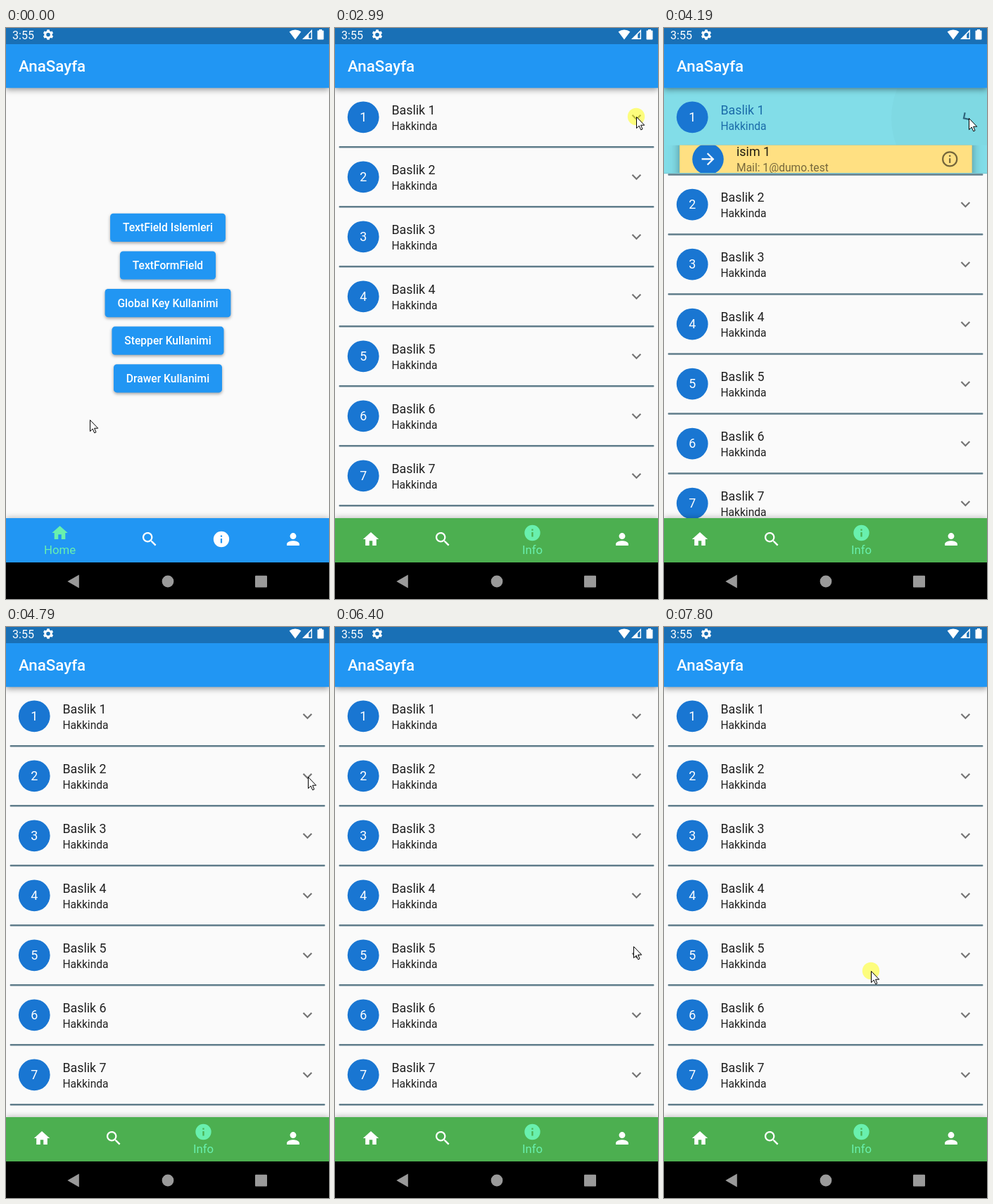
Recreate the animation shown at these times as an HTML page with a canvas. Size 459 by 812 pixels, loop 8 s.

```html
<!DOCTYPE html>
<html lang="tr">
<head>
<meta charset="utf-8">
<title>AnaSayfa</title>
<style>
  html, body { margin: 0; width: 100%; height: 100%; overflow: hidden; background: #fafafa; }
  canvas { display: block; }
</style>
</head>
<body>
<canvas id="stage" width="459" height="812"></canvas>
<script>
const ctx = document.getElementById('stage').getContext('2d');
const W = 459, DP = 1.1157, LOOP = 8000;
const BLUE = '#2196f3', NAVY = '#1976d2', GREEN = '#4caf50', CYAN = '#4dd0e1', AMBER = '#ffe082';
const WHITE = [255, 255, 255, 1], MINT = [105, 240, 174, 1], ACCENT = [33, 150, 243, 1];
const INK = [0, 0, 0, .87], FADED = [0, 0, 0, .54];

const icons = {
  home: 'M10 20v-6h4v6h5v-8h3L12 3 2 12h3v8z',
  search: 'M15.5 14h-.8l-.3-.3A6.5 6.5 0 1 0 13.7 14.4l.3.3v.8l5 5L20.5 19zM9.5 14a4.5 4.5 0 1 1 0-9 4.5 4.5 0 0 1 0 9z',
  info: 'M12 2a10 10 0 1 0 0 20 10 10 0 0 0 0-20zM13 17h-2v-6h2zM13 9h-2V7h2z',
  infoOutline: 'M12 2a10 10 0 1 0 0 20 10 10 0 0 0 0-20zM12 20a8 8 0 1 1 0-16 8 8 0 0 1 0 16zM11 7h2v2h-2zM11 11h2v6h-2z',
  person: 'M12 12a4 4 0 1 0 0-8 4 4 0 0 0 0 8zM12 14c-2.7 0-8 1.3-8 4v2h16v-2c0-2.7-5.3-4-8-4z',
  arrow: 'M12 4l-1.4 1.4L16.2 11H4v2h12.2l-5.6 5.6L12 20l8-8z',
  chevron: 'M16.6 8.6L12 13.2 7.4 8.6 6 10l6 6 6-6z'
};
for (const name in icons) icons[name] = new Path2D(icons[name]);
const pointerShape = new Path2D('M.5.5V16.6L4.2 13.1 6.7 18.8 9 17.8 6.6 12.2H11.7Z');

// Pointer stops: time, x, y
const pointerPath = [
  [170, 119, 557], [970, 308, 724], [1770, 308, 724], [2790, 428, 126], [3590, 428, 126],
  [3990, 433, 128], [4290, 433, 128], [4790, 429, 213], [6190, 429, 213], [6400, 424, 454],
  [7000, 424, 454], [7200, 294, 489]
];
const clicks = [1570, 2990, 3990, 4990, 5990, 6800, 7600, 7800];
// Row index: time it starts to open, time it starts to close
const openings = { 0: [3090, 4090], 1: [5090, 6090], 4: [6900, 7500] };
const PAGE_SWITCH = 1670;

const clamp = v => Math.max(0, Math.min(1, v));
const lerp = (a, b, t) => a + (b - a) * t;
const easeIn = t => t ** 1.67;
const easeOut = t => 1 - (1 - t) ** 1.67;
const smooth = t => t * t * (3 - 2 * t);
const mix = (a, b, t) => `rgba(${a.map((v, i) => lerp(v, b[i], t)).join()})`;
const ramp = (t, start) => clamp((t - start) / 200);

function sampleTime(t) {
  if (t < 370) return 0;
  const offset = t < 2790 ? 370 : t < 6400 ? 390 : 400;
  return Math.floor((t - offset) / 200) * 200 + offset;
}

function pointerAt(t) {
  const next = pointerPath.findIndex(p => p[0] > t);
  if (next === 0) return pointerPath[0].slice(1);
  if (next < 0) return pointerPath[pointerPath.length - 1].slice(1);
  const [t0, x0, y0] = pointerPath[next - 1], [t1, x1, y1] = pointerPath[next];
  const k = smooth((t - t0) / (t1 - t0));
  return [lerp(x0, x1, k), lerp(y0, y1, k)];
}

function rect(x, y, w, h, color, radius = 0) {
  ctx.fillStyle = color;
  ctx.beginPath();
  ctx.roundRect(x, y, w, h, radius);
  ctx.fill();
}

function raised(blur, dy, alpha, ...box) {
  ctx.save();
  ctx.shadowColor = `rgba(0,0,0,${alpha})`;
  ctx.shadowBlur = blur;
  ctx.shadowOffsetY = dy;
  rect(...box);
  ctx.restore();
}

function disc(x, y, r, color) {
  ctx.fillStyle = color;
  ctx.beginPath();
  ctx.arc(x, y, r, 0, 7);
  ctx.fill();
}

function polygon(color, ...points) {
  ctx.fillStyle = color;
  ctx.beginPath();
  for (const p of points) ctx.lineTo(...p);
  ctx.fill();
}

function text(str, x, y, size, color, align = 'left', weight = 400) {
  ctx.font = `${weight} ${size * DP}px Roboto, sans-serif`;
  ctx.textAlign = align;
  ctx.fillStyle = color;
  ctx.fillText(str, x, y);
}

function icon(name, x, y, color, turn = 0) {
  ctx.save();
  ctx.translate(x, y);
  ctx.rotate(turn * 2 * Math.PI);
  ctx.scale(DP, DP);
  ctx.translate(-12, -12);
  ctx.fillStyle = color;
  ctx.fill(icons[name], 'evenodd');
  ctx.restore();
}

function clipped(x, y, w, h, draw) {
  ctx.save();
  ctx.beginPath();
  ctx.rect(x, y, w, h);
  ctx.clip();
  draw();
  ctx.restore();
}

function homePage() {
  ['TextField Islemleri', 'TextFormField', 'Global Key Kullanimi', 'Stepper Kullanimi', 'Drawer Kullanimi']
    .forEach((label, i) => {
      const y = 263.8 + i * 53.6;
      ctx.font = `500 ${14 * DP}px Roboto, sans-serif`;
      const w = ctx.measureText(label).width + 32 * DP;
      raised(4, 2, .35, 230 - w / 2, y, w, 40.2, BLUE, 4.5);
      text(label, 230, y + 25.6, 14, '#fff', 'center', 500);
    });
}

function card(number, top, color) {
  raised(20, 4, .16, 22.3, top, 415.2, 80.3, color, 4.5);
  raised(11, 8, .26, 22.3, top, 415.2, 80.3, color, 4.5);
  disc(62.5, top + 40.2, 22.3, NAVY);
  icon('arrow', 62.5, top + 40.2, '#fff');
  text(`isim ${number}`, 103, top + 35.7, 16, mix(INK, INK, 0));
  text(`Mail: ${number}@dumo.test`, 103, top + 58, 14, mix(FADED, FADED, 0));
  icon('infoOutline', 406.2, top + 40.2, mix(FADED, FADED, 0));
}

// Draws one expandable row and returns the top of the next
function row(i, top, t, pointer) {
  const [opens, closes] = openings[i] || [Infinity, Infinity];
  const v = ramp(t, opens) - ramp(t, closes);
  const unfolded = easeIn(v), tint = easeOut(v);
  const body = 124.9 * unfolded, y = top + 1.2;
  const [back, front] = i % 2 ? [AMBER, CYAN] : [CYAN, AMBER];

  if (v > 0) {
    ctx.globalAlpha = tint;
    rect(0, top, W, 82.6 + body, back);
    rect(0, top, W, 1.1, 'rgba(0,0,0,.12)');
    rect(0, top + 81.5 + body, W, 1.1, 'rgba(0,0,0,.12)');
    ctx.globalAlpha = 1;
    if (v < 1) clipped(0, y, W, 80.3, () => disc(...pointer, 220 * (1 - v), 'rgba(0,0,0,.02)'));
    clipped(0, y + 80.3, W, body, () => card(i + 1, y + 40.1 + body / 2, front));
  }
  const color = mix(INK, ACCENT, tint);
  disc(40.2, y + 40.3, 22.4, NAVY);
  text(i + 1, 40.2, y + 46.7, 16, '#fff', 'center');
  text(`Baslik ${i + 1}`, 80.4, y + 36, 16, color);
  text('Hakkinda', 80.4, y + 58.3, 14, color);
  icon('chevron', 428.4, y + 40.3, mix(FADED, ACCENT, unfolded), unfolded / 2);
  rect(5.6, top + 82.8 + body, W - 11.2, 2.3, '#607d8b', 1);
  return top + 85 + body;
}

function navigation(p) {
  raised(8, -1, .25, 0, 697, W, 63, BLUE);
  const items = [['home', 'Home', 1 - p], ['search', '', 0], ['info', 'Info', p], ['person', '', 0]];
  if (p > 0) clipped(0, 697, W, 63, () => disc(lerp(306, 280.5, p), 728, 310 * p, GREEN));
  let left = 0;
  for (const [name, label, active] of items) {
    const width = 102 * (1 + active / 2), x = left + width / 2;
    icon(name, x, 727 - 9 * active, mix(WHITE, MINT, active));
    ctx.globalAlpha = active;
    text(label, x, 747.8, 15, mix(MINT, MINT, 0), 'center');
    ctx.globalAlpha = 1;
    left += width;
  }
}

function gear(x, y) {
  ctx.strokeStyle = '#fff';
  ctx.lineWidth = 3;
  ctx.beginPath();
  ctx.arc(x, y, 4.3, 0, 7);
  ctx.stroke();
  ctx.lineWidth = 3.6;
  for (let i = 0; i < 6; i++) {
    const a = i * Math.PI / 3 + Math.PI / 6, c = Math.cos(a), s = Math.sin(a);
    ctx.beginPath();
    ctx.moveTo(x + 4.5 * c, y + 4.5 * s);
    ctx.lineTo(x + 7.2 * c, y + 7.2 * s);
    ctx.stroke();
  }
}

function topBars() {
  raised(8, 3, .38, 0, 0, W, 85.3, BLUE);
  text('AnaSayfa', 18, 62.4, 20, '#fff', 'left', 500);
  rect(0, 0, W, 23, '#1970b6');
  text('3:55', 9, 16, 14.4, '#fff');
  gear(60, 9.5);
  ctx.fillStyle = '#fff';
  ctx.beginPath();
  ctx.moveTo(411, 16.5);
  ctx.arc(411, 16.5, 14, -Math.PI * .705, -Math.PI * .295);
  ctx.fill();
  polygon('#fff', [421, 16], [435, 2], [435, 16]);
  polygon('#1970b6', [430.2, 9], [433.6, 5.6], [433.6, 14.6], [430.2, 14.6]);
  rect(442.5, 3.5, 9, 13, '#fff', 1);
  rect(445, 2, 4, 2, '#fff');
}

function systemBar() {
  const gray = '#9a9a9a';
  rect(0, 760, W, 52, '#000');
  polygon(gray, [87.3, 787], [103.8, 777.4], [103.8, 796.6]);
  disc(230, 787, 8.4, gray);
  rect(354, 778.8, 17, 16.8, gray, 1);
}

function pointerMark(x, y, pressed) {
  if (pressed) disc(x, y, 12.2, 'rgba(255,255,0,.5)');
  ctx.save();
  ctx.translate(x, y);
  ctx.fillStyle = '#fff';
  ctx.strokeStyle = '#000';
  ctx.lineWidth = 1;
  ctx.fill(pointerShape);
  ctx.stroke(pointerShape);
  ctx.restore();
}

function draw(now) {
  const clock = now % LOOP, t = sampleTime(clock);
  const pointer = pointerAt(t);
  rect(0, 0, W, 812, '#fafafa');
  if (t < PAGE_SWITCH) homePage();
  else for (let i = 0, top = 85.3; i < 7; i++) top = row(i, top, t, pointer);
  navigation(easeOut(ramp(t, PAGE_SWITCH)));
  topBars();
  systemBar();
  pointerMark(...pointer, clicks.some(c => clock >= c && clock < c + 200));
  requestAnimationFrame(draw);
}
requestAnimationFrame(draw);
</script>
</body>
</html>
```
